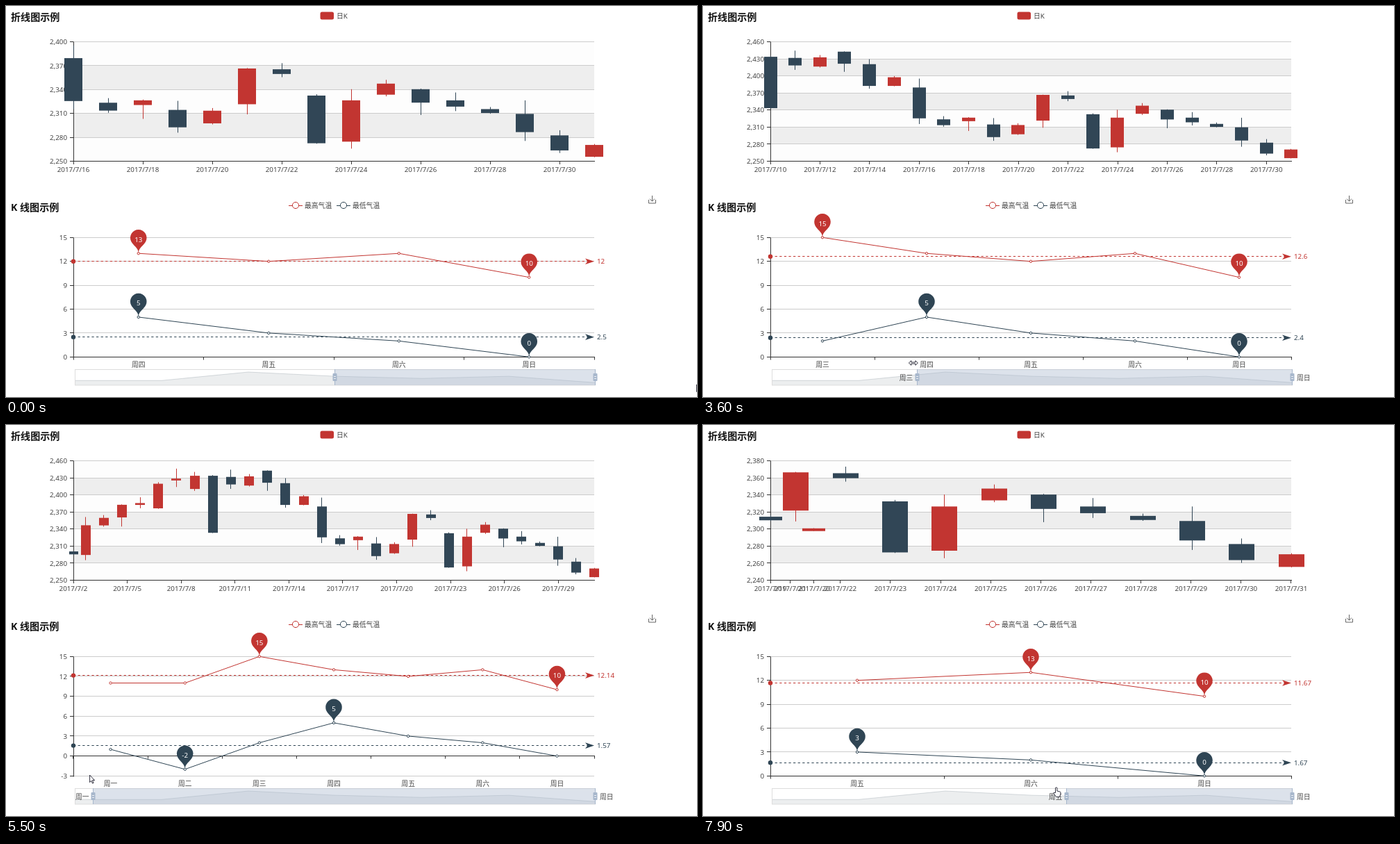
An HTML page for the animation above (8000 ms loop, 995 by 563 pixels).

```html
<!DOCTYPE html>
<html lang="zh">
<head>
<meta charset="utf-8">
<title>图表联动缩放</title>
<style>
html, body { margin: 0; width: 100%; height: 100%; overflow: hidden; background: #fff; }
svg { display: block; }
text { font: 9.8px "Noto Sans", "Noto Sans CJK SC", "Noto Sans CJK", sans-serif; fill: #444; }
.title { font-size: 14.1px; font-weight: 700; fill: #111; }
.mid { text-anchor: middle; }
.end { text-anchor: end; }
.pin { text-anchor: middle; fill: #fff; font-weight: 500; }
</style>
</head>
<body>
<svg width="995" height="563" viewBox="0 0 995 563">
  <text class="title" x="7" y="20.5">折线图示例</text>
  <text class="title" x="7" y="294.5">K 线图示例</text>
  <rect x="452.5" y="8.5" width="19.5" height="11" rx="2.5" fill="#c23531"/>
  <text x="476" y="17.5">日K</text>
  <g fill="#fff" stroke="#c23531"><path d="M407 287.5h20"/><circle cx="417" cy="287" r="4.6"/></g>
  <text x="430" y="290.5">最高气温</text>
  <g fill="#fff" stroke="#2f4554"><path d="M476 287.5h20"/><circle cx="486" cy="287" r="4.6"/></g>
  <text x="499" y="290.5">最低气温</text>
  <path d="M925.5 279v5h10v-5M930.5 273v8M927 277.7l3.5 3.5 3.5-3.5" fill="none" stroke="#666"/>
  <g id="scene"></g>
</svg>
<script>
const LOOP = 8000, TICK = 100, LEFT = 97, WIDTH = 750, RIGHT = LEFT + WIDTH;
const RED = '#c23531', BLUE = '#2f4554', DARK = '#314656', GRIP = '#a7b7cc';
const DAYS = [...'一二三四五六日'].map(d => '周' + d);
const TEMPS = [[11, 11, 15, 13, 12, 13, 10], [1, -2, 2, 5, 3, 2, 0]];

// Each day's open and close; the wicks follow a golden-ratio sequence
const BODIES = [
  [2320, 2320], [2300, 2291], [2295, 2346], [2347, 2359], [2361, 2382], [2383, 2385],
  [2377, 2419], [2426, 2428], [2411, 2433], [2433, 2334], [2431, 2419], [2417, 2432],
  [2442, 2422], [2420, 2383], [2383, 2397], [2379, 2326], [2323, 2314], [2321, 2326],
  [2314, 2293], [2298, 2313], [2322, 2366], [2365, 2360], [2332, 2273], [2275, 2326],
  [2334, 2347], [2340, 2324], [2326, 2319], [2315, 2311], [2309, 2287], [2282, 2264],
  [2256, 2270]
];
const wick = (n, shift) => 1 + 18 * ((n * .618034 + shift) % 1) ** 2;
const PRICES = BODIES.map(([o, c], n) =>
  [o, c, Math.min(o, c) - wick(n, .46), Math.max(o, c) + wick(n, .65)]);

// Left slider handle as it is dragged: [time, x]
const DRAG = [[1900, 473.5], [2560, 438], [2610, 409], [2800, 381.5], [4300, 244.5],
  [5280, 140], [5500, 125.5], [5800, 99], [6350, 99], [6900, 280], [6965, 392],
  [7100, 418], [7500, 600], [7750, 600], [7785, 555], [8000, 496]];
// Pointer on its way to the handle: [time, x, y]
const APPROACH = [[0, 994, 545], [900, 574, 527], [1600, 471.5, 514.5]];

const lerp = (a, b, p) => a + (b - a) * p;
const mix = (a, b, p) => a.map((v, i) => lerp(v, b[i], p));
const crisp = v => Math.floor(v) + .5;
const clamp = v => Math.max(0, Math.min(1, v));

function keyed(keys, t) {
  const n = keys.findIndex(k => k[0] > t);
  if (n < 0) return keys[keys.length - 1].slice(1);
  if (n === 0) return keys[0].slice(1);
  const [a, b] = [keys[n - 1], keys[n]];
  return mix(a, b, (t - a[0]) / (b[0] - a[0])).slice(1);
}
const grip = t => keyed(DRAG, t)[0];

// The charts follow the handle late and at a throttled rate
const LAG = 85, THROTTLE = 35;
function stepsFor(last) {
  const steps = [];
  for (let t = 0; t < LOOP; t += THROTTLE) {
    const i = Math.round((grip(t - LAG) - 99) / WIDTH * last);
    if (!steps.length || i !== steps[steps.length - 1][1]) steps.push([t, i]);
  }
  return steps;
}
const kSteps = stepsFor(30), tSteps = stepsFor(6);

// Eased values that restart from wherever they are at each step
function track(steps, target, power) {
  const at = (s, t) => mix(s.from, s.to, 1 - (1 - clamp((t - s.t) / 300)) ** power);
  const segs = [];
  for (const [t, i] of steps) {
    const last = segs[segs.length - 1], to = target(i);
    segs.push({ t, i, to, prev: last ? last.i : i, from: last ? at(last, t) : to });
  }
  return t => {
    const s = segs.filter(s => s.t <= t).pop();
    return { ...s, now: at(s, t), p: clamp((t - s.t) / 300) };
  };
}

function ticksFor(values) {
  const lo = Math.min(...values), hi = Math.max(...values), raw = (hi - lo) / 5;
  const unit = 10 ** Math.floor(Math.log10(raw)), f = raw / unit;
  const step = unit * (f < 1.5 ? 1 : f < 2.5 ? 2 : f < 4 ? 3 : f < 7 ? 5 : 10);
  const out = [];
  for (let v = Math.floor(lo / step) * step; v < hi + step; v += step) out.push(v);
  return out;
}
const kTicks = i => ticksFor(PRICES.slice(i).flat());
const tTicks = i => ticksFor(TEMPS.flatMap(s => s.slice(i)));

// A layout is [x0, dx, y0, dy]: x = x0 + dx * index, y = y0 + dy * value
function layout(x0, dx, ticks, bottom) {
  const lo = ticks[0], dy = -172 / (ticks[ticks.length - 1] - lo);
  return [x0, dx, bottom - lo * dy, dy];
}
const px = (m, i) => m[0] + m[1] * i;
const py = (m, v) => m[2] + m[3] * v;
function kLayout(i) {
  const d = WIDTH / (30 - i);
  return layout(LEFT - i * d, d, kTicks(i), 223.5);
}
function tLayout(i) {
  const d = WIDTH / (7 - i);
  return layout(LEFT + d / 2 - i * d, d, tTicks(i), 505.3);
}

const mean = a => a.reduce((x, y) => x + y) / a.length;
function pinsFor(i) {
  return TEMPS.flatMap((s, n) => [Math.max, Math.min].map(pick => {
    const v = pick(...s.slice(i));
    return { v, at: s.indexOf(v, i), color: n ? BLUE : RED };
  }));
}
const marks = i => {
  const m = tLayout(i);
  return [...pinsFor(i).flatMap(p => [px(m, p.at), py(m, p.v)]),
    ...TEMPS.map(s => py(m, mean(s.slice(i))))];
};

const kAxis = track(kSteps, kLayout, 3), kData = track(kSteps, kLayout, 4);
const tAxis = track(tSteps, tLayout, 3), tData = track(tSteps, tLayout, 4);
const tMarks = track(tSteps, marks, 3);

const text = (x, y, s, cls = '', fill = '') =>
  `<text x="${x}" y="${y + 3.6}" class="${cls}"${fill && ` style="fill:${fill}"`}>${s}</text>`;
const path = (d, stroke, more = '') => `<path d="${d}" fill="none" stroke="${stroke}" ${more}/>`;
const rect = (x, y, w, h, fill, more = '') =>
  `<rect x="${x}" y="${y}" width="${w}" height="${h}" fill="${fill}" ${more}/>`;

// Marks already on screen slide; new ones appear in place
function valueAxis(axis, ticksOf, top, striped) {
  const old = ticksOf(axis.prev), ticks = ticksOf(axis.i);
  const ys = ticks.map(v => py(old.includes(v) ? axis.now : axis.to, v));
  let out = '';
  if (striped) for (let n = 1; n < ys.length; n++) {
    out += rect(LEFT, ys[n], WIDTH, Math.max(0, ys[n - 1] - ys[n]), n % 2 ? '#fdfdfd' : '#eee');
  }
  out += path(ys.map(y => `M${LEFT} ${crisp(y)}h${WIDTH}`).join(''), '#ccc');
  out += path(`M${LEFT}.5 ${crisp(top)}v173` + ys.map(y => `M92 ${crisp(y)}h5`).join(''), '#333');
  return out + ys.map((y, n) => text(88, y, ticks[n].toLocaleString('en-US'), 'end')).join('');
}

function dateLabels(i) {
  const gap = Math.ceil(62 / (WIDTH / (30 - i))), out = [];
  for (let n = i; n <= 30; n += gap) out.push(n);
  return out;
}

function candleChart(t) {
  const axis = kAxis(t), data = kData(t), old = dateLabels(axis.prev);
  let out = valueAxis(axis, kTicks, 51.5, true) + path(`M${LEFT} 223.5h${WIDTH + 1}`, '#333');
  for (const n of dateLabels(axis.i)) {
    const x = px(old.includes(n) ? axis.now : axis.to, n);
    out += path(`M${crisp(x)} 223v5`, '#333') + text(x, 235, '2017/7/' + (n + 1), 'mid');
  }
  for (let n = data.i; n <= 30; n++) {
    const fresh = n < data.prev, m = fresh ? data.to : data.now;
    const grow = fresh ? 1 - (1 - data.p) ** 2 : 1;
    const [o, c, l, h] = PRICES[n].map(v => py(m, lerp(PRICES[n][0], v, grow)));
    const x = px(m, n), w = Math.round(m[1] * .52), color = PRICES[n][1] > PRICES[n][0] ? RED : DARK;
    out += path(`M${crisp(x)} ${h}V${l}`, color);
    out += rect(Math.round(x - w / 2), Math.min(o, c) - .5, w, Math.abs(o - c) + 1, color);
  }
  return out;
}

function pin(x, y, label, color) {
  const r = 11.8, h = 39.3, dy = r * r / (h - r), cy = y - h + r + dy;
  const sin = dy / r, cos = Math.sqrt(1 - sin * sin), dx = cos * r;
  const ex = dx - sin * r * .6, ey = cy + dy + cos * r * .6, ny = y - r * .7;
  return `<path fill="${color}" d="M${x - dx} ${cy + dy}A${r} ${r} 0 1 1 ${x + dx} ${cy + dy}` +
    `C${x + ex} ${ey} ${x} ${ny} ${x} ${y}C${x} ${ny} ${x - ex} ${ey} ${x - dx} ${cy + dy}Z"/>` +
    text(x, y - 20.3, label, 'pin');
}

function lineChart(t) {
  const axis = tAxis(t), data = tData(t), mark = tMarks(t), { i, prev } = axis;
  const zero = crisp(py(axis.now, 0)), startX = px(data.to, i);
  let out = valueAxis(axis, tTicks, 333.3, false) + path(`M${LEFT} ${zero}h${WIDTH + 1}`, '#333');
  for (let n = i; n <= 7; n++) {
    const m = n < prev ? axis.to : axis.now;
    out += path(`M${crisp(px(m, n - .5))} ${zero}v4`, '#333');
    if (n < 7) out += text(px(m, n), 516, DAYS[n], 'mid');
  }
  out += `<clipPath id="clip">${rect(startX, 300, 900, 220, '#000')}</clipPath>`;
  const first = Math.min(i, prev), fade = 1 - axis.p;
  TEMPS.forEach((s, n) => {
    const color = n ? BLUE : RED;
    const pts = s.slice(first).map((v, k) => [px(data.now, first + k), py(data.now, v)]);
    out += path('M' + pts.join('L'), color, 'clip-path="url(#clip)"');
    s.forEach((v, k) => {
      if (k < first) return;
      const gone = k < i, fresh = k < prev;
      const m = gone ? tLayout(prev) : fresh ? data.to : data.now;
      const size = gone ? fade ** 3 : fresh ? axis.p : 1;
      if (size < .02) return;
      out += `<circle cx="${px(m, k)}" cy="${py(m, v)}" r="${1.7 * size}" fill="#fff" ` +
        `stroke="${color}" stroke-width="${size}"/>`;
    });
  });
  TEMPS.forEach((s, n) => {
    const color = n ? BLUE : RED, y = mark.now[8 + n];
    out += path(`M${LEFT} ${crisp(y)}H838`, color, 'stroke-dasharray="3.3 3.3"');
    out += `<circle cx="${LEFT}" cy="${y}" r="3.2" fill="${color}"/>`;
    out += `<path fill="${color}" d="M${RIGHT} ${y}l-13-4.3 3.4 4.3-3.4 4.3z"/>`;
    out += text(851, y, +mean(s.slice(i)).toFixed(2), '', color);
  });
  pinsFor(i).forEach((p, n) => {
    out += pin(mark.now[2 * n], mark.now[2 * n + 1], p.v, p.color);
  });
  return out;
}

function slider(t) {
  const x = grip(t), end = 848.5;
  const curve = TEMPS[0].map((v, n) => [99 + 125 * n, 527 + (15 - v) * 3.07]).join('L');
  let out = `<path d="M99 546L${curve}V546Z" fill="${BLUE}" fill-opacity=".09"/>` +
    path('M' + curve, BLUE, 'stroke-opacity=".3" stroke-width=".6"') +
    rect(99.5, 523.5, 749, 22.5, 'none', 'stroke="#ddd"') +
    rect(x, 523, end - x, 23, GRIP, 'fill-opacity=".4"');
  for (const g of [x, end]) {
    const c = crisp(g);
    out += path(`M${c} 523v23`, GRIP) + rect(c - 3, 529, 6, 11, GRIP, 'rx="1"') +
      path(`M${c - 1.5} 533.5h3M${c - 1.5} 536.5h3`, '#fff', 'stroke-width=".8"');
  }
  if (t >= 400) {
    out += text(x - 6, 535, DAYS[tAxis(t).i], 'end') + text(855, 535, DAYS[6]);
  }
  return out;
}

const CURSORS = {
  arrow: 'M.5 0V10.5L2.8 8.3 4.4 12 6 11.3 4.4 7.6H7.5Z',
  resize: 'M-6.5 0L-3-3.3V-1H3V-3.3L6.5 0 3 3.3V1H-3V3.3Z',
  move: 'M0-6.5L2.5-4H.9V-.9H4V-2.5L6.5 0 4 2.5V.9H.9V4H2.5L0 6.5-2.5 4H-.9V.9H-4V2.5L-6.5 0-4-2.5V-.9H-.9V-4H-2.5Z',
  hand: 'M-1.2 7.5V1a1.2 1.2 0 0 1 2.4 0V5l4 1q1.3.4 1.1 1.8l-.6 3-1.1 2.7H0L-3.7 8.8q-.7-1.7 1-1.5z'
};
const DRAG_Y = { resize: 514, arrow: 504, hand: 522 };

function cursor(t) {
  const kind = t < 400 ? 'arrow' : t < 1500 ? 'move' : t < 5500 ? 'resize' : t < 6400 ? 'arrow' : 'hand';
  // While dragging, the pointer runs slightly ahead of the handle
  const [x, y] = t <= 1600 ? keyed(APPROACH, t) : [grip(t + 50) - 1, DRAG_Y[kind]];
  return `<path transform="translate(${x} ${y})" d="${CURSORS[kind]}" fill="#fff" stroke="#1a1a2a" stroke-width=".9"/>`;
}

const scene = document.getElementById('scene');
let shown = -1;
function frame() {
  const t = Math.floor(performance.now() % LOOP / TICK) * TICK;
  if (t !== shown) {
    scene.innerHTML = candleChart(t) + lineChart(t) + slider(t) + cursor(t);
    shown = t;
  }
  requestAnimationFrame(frame);
}
frame();
</script>
</body>
</html>
```
